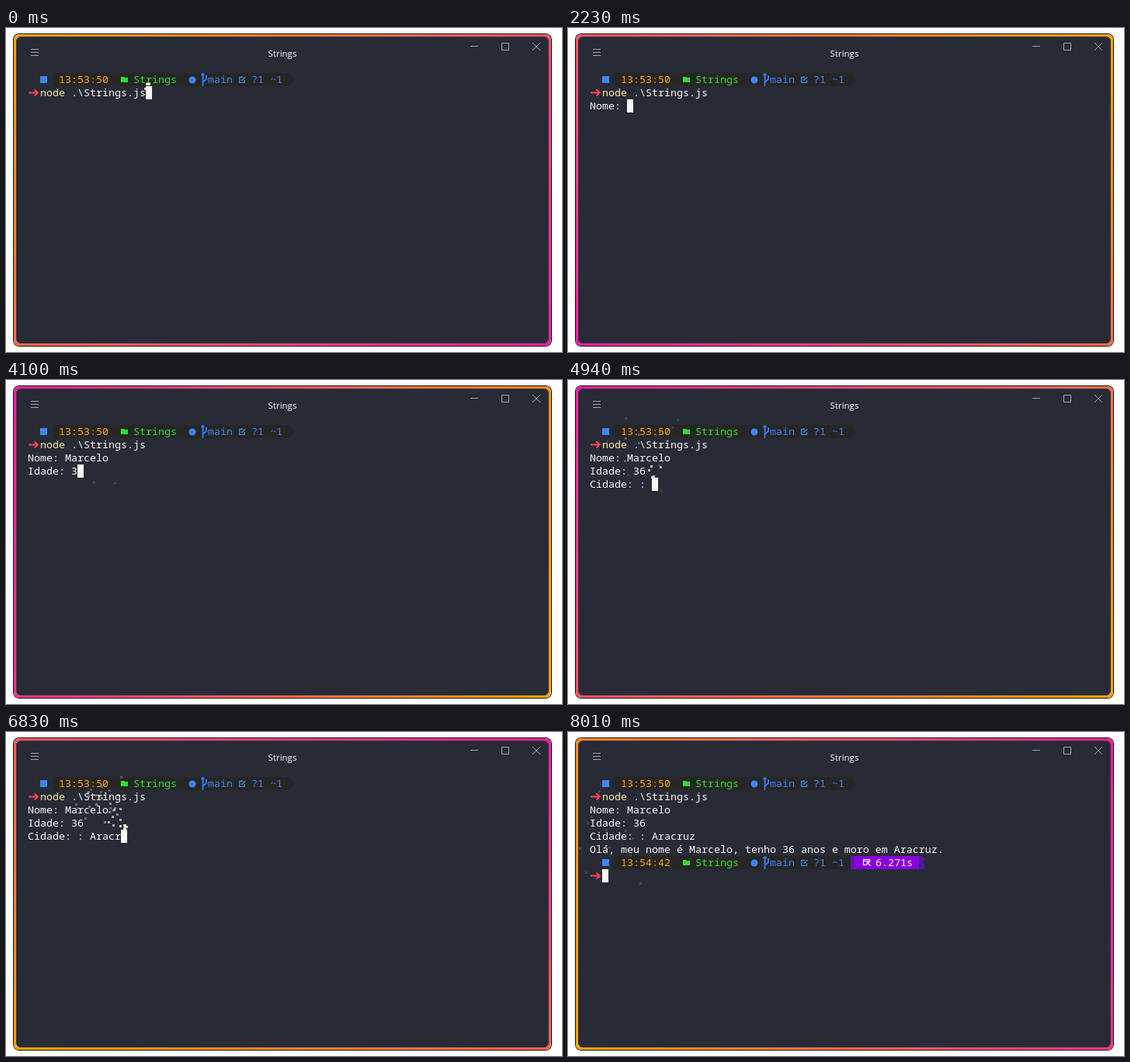
Recreate the animation shown at these times as an HTML page with a canvas. Size 716x418 px, loop 8080 ms.

```html
<!DOCTYPE html>
<html lang="pt">
<head>
<meta charset="utf-8">
<title>Strings</title>
<style>
html, body { margin: 0; width: 100%; height: 100%; overflow: hidden; background: #fff; }
#border { position: absolute; left: 10px; top: 8px; width: 692px; height: 402px;
  border-radius: 7px; box-shadow: 0 0 0 1px #111; }
#panel { position: absolute; left: 13px; top: 11px; width: 684px; height: 394px;
  border: 1px solid #3a3644; border-radius: 6px; background: #282a36; }
svg, canvas { position: absolute; left: 0; top: 0; }
text { font: 13.333px "Noto Sans Mono", "DejaVu Sans Mono", monospace; fill: #f8f8f2; white-space: pre; }
.title { font: 11.5px "Open Sans", "Noto Sans", sans-serif; fill: #fff; }
.time { fill: #ffa318; }
.green { fill: #2ee02e; }
.blue { fill: #3a86f5; }
.line { fill: none; stroke: #a5a6ab; }
.pen { fill: none; stroke: #3a86f5; stroke-width: 1.3; }
.branch { fill: none; stroke: #2f78ff; stroke-width: 2; }
</style>
</head>
<body>
<div id="border"></div>
<div id="panel"></div>
<svg width="716" height="418">
  <path class="line" d="M32 27.5h10M32 31.5h10M32 35.5h10M598 23.5h10M638.5 19.5h9v9h-9zM678 19l10 10M688 19l-10 10"/>
  <text class="title" x="356" y="37" text-anchor="middle">Strings</text>
  <g id="first"></g>
  <g id="typed"></g>
  <g id="last"></g>
  <rect id="cursor" width="8" height="17" fill="#f8f8f2"/>
</svg>
<canvas id="sparks" width="716" height="418"></canvas>
<script>
const LOOP = 8080, NAME = "Marcelo", CITY = "Aracruz";
const $ = id => document.getElementById(id);
const colX = col => 28 + 8 * col;
const rowY = row => 58 + 17 * row;

const textAt = (col, row, text, cls = "") =>
  `<text class="${cls}" x="${colX(col)}" y="${rowY(row) + 13}">${text}</text>`;

// Status line plus the arrow on the row below it.
const prompt = (row, clock) => `
  <g transform="translate(0 ${rowY(row) - 58})">
    <path d="M60 58H364L372 66.5L364 75H60z" fill="#262625"/>
    <rect class="blue" x="44" y="62" width="9" height="9"/>
    <path class="green" d="M148 63h4l1 1h4v6h-9z"/>
    <circle class="blue" cx="240" cy="67" r="4.5"/>
    <path class="branch" d="M253.5 58V75M253.5 72V70L258 66V61M251.5 61l2-2l2 2"/>
    <path class="pen" d="M305 63.5h-4.4v6.8h6.8v-3M303.5 67.8l5-4.8"/>
    <path d="M29 83.5H40M36.5 79.5L41 83.5L36.5 87.5" fill="none" stroke="#ff4058" stroke-width="2"/>
  </g>` +
  textAt(5, row, clock, "time") + textAt(17, row, "Strings", "green") +
  textAt(29, row, "main", "blue") + textAt(36, row, "?1 ~1", "blue");

$("first").innerHTML = prompt(0, "13:53:50") +
  textAt(2, 1, `<tspan fill="#f1eda5">node</tspan> .\\Strings.js`);

$("last").innerHTML =
  textAt(0, 5, `Olá, meu nome é ${NAME}, tenho 36 anos e moro em ${CITY}.`) +
  prompt(6, "13:54:42") + `
  <path d="M364 160H452V177H364z" fill="#8a00dc"/>
  <path d="M366 160q5 4 2 8.5t2 8.5h-6v-17z" fill="#5c16a8"/>
  <path d="M452 160h4q5 4 1 8q5 4 0 9h-5z" fill="#43219a"/>
  <path d="M385 171.5h-4.5v-7h8v4M380 166.5h9M385 168l4.5 4.5M385 168v3M385 168h3" fill="none" stroke="#fff" stroke-width="1.2"/>` +
  textAt(46, 6, "6.271s");

// Each step sets a row's text and leaves the cursor behind it.
const steps = [];
const put = (time, row, text) => steps.push({ time, row, text });
const type = (row, label, word, times) =>
  times.forEach((time, i) => put(time, row, label + word.slice(0, i + 1)));

put(-75, 1, " ".repeat(19));
put(690, 2, "");
put(780, 2, "Nome: ");
type(2, "Nome: ", NAME, [2350, 2480, 2610, 2740, 2850, 2950, 3060]);
put(3190, 3, "Idade: ");
type(3, "Idade: ", "36", [4060, 4400]);
put(4800, 4, "Cidade: : ");
type(4, "Cidade: : ", CITY, [6240, 6370, 6500, 6630, 6750, 6880, 6990]);
put(7110, 5, "");
const END = 7200;
put(END, 7, "  ");

$("typed").innerHTML = [2, 3, 4].map(row => textAt(0, row, "")).join("");
const lines = [...$("typed").children];
const ctx = $("sparks").getContext("2d");
ctx.fillStyle = "#f8f8f2";

function random(n) {
  const v = Math.sin(n * 12.9898 + 4.1) * 43758.5453;
  return v - Math.floor(v);
}

function drawSparks(step, index, t) {
  const n = (t - step.time) / 16.67;
  const alpha = 0.96 ** n;
  if (n < 0 || alpha < 0.1) return;
  ctx.globalAlpha = alpha;
  const count = 5 + Math.round(5 * random(index + 0.5));
  for (let i = 0; i < count; i++) {
    const seed = index * 40 + i * 2;
    const vx = 2 * random(seed) - 1;
    const vy = 2 * random(seed + 1) - 3.5;
    ctx.fillRect(Math.round(colX(step.text.length) + 2 + vx * n),
      Math.round(rowY(step.row) + 8 + vy * n + 0.0375 * n * n), 3, 3);
  }
}

function draw() {
  const t = performance.now() % LOOP;
  $("border").style.background =
    `linear-gradient(${320 + t * 0.036}deg, #fc1da7, #fba506)`;

  const done = steps.filter(s => s.time <= t);
  lines.forEach((line, i) => {
    const step = done.findLast(s => s.row === i + 2);
    line.textContent = step ? step.text : "";
  });
  const now = done.at(-1);
  $("cursor").setAttribute("x", colX(now.text.length));
  $("cursor").setAttribute("y", rowY(now.row));
  $("last").style.display = t < END ? "none" : "";

  ctx.clearRect(0, 0, 716, 418);
  steps.forEach((step, i) => drawSparks(step, i, t));
  requestAnimationFrame(draw);
}
draw();
</script>
</body>
</html>
```
